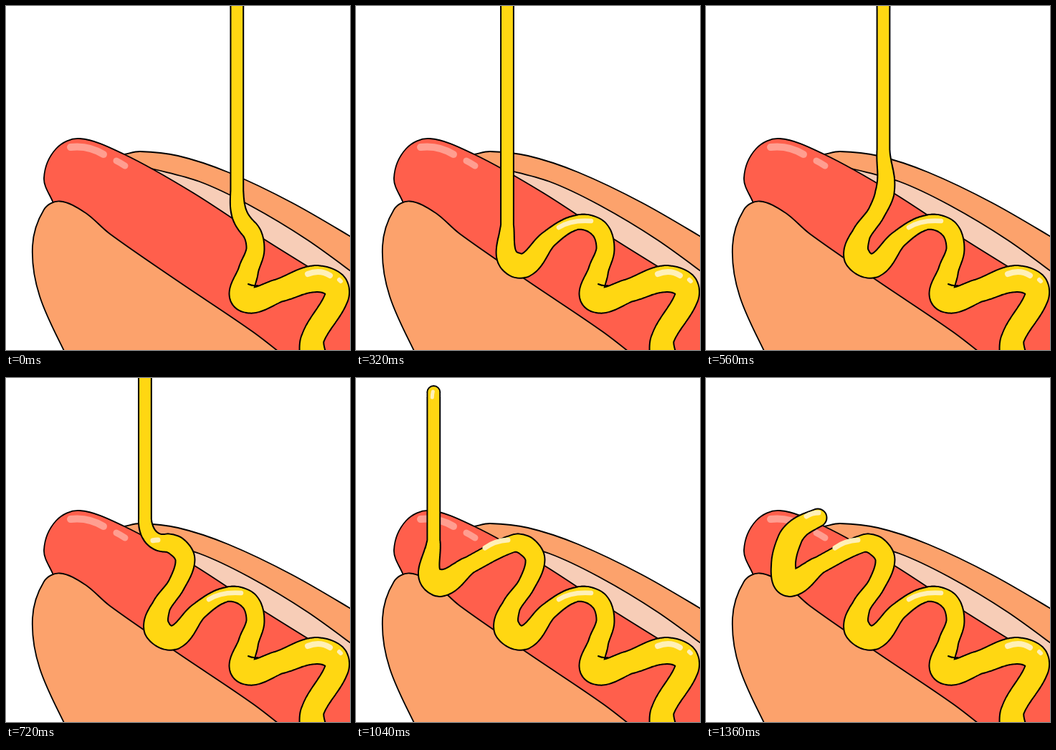
Animation of 480 by 480 pixels, one loop 1440 ms. Source, as an HTML page with a canvas:

```html
<!DOCTYPE html>
<html lang="en">
<head>
<meta charset="utf-8">
<title>Mustard pour</title>
<style>
  html, body { margin: 0; width: 100%; height: 100%; overflow: hidden; background: #fff; }
  canvas { display: block; width: 100vw; height: 100vh; }
</style>
</head>
<body>
<canvas id="stage" width="480" height="480"></canvas>
<script>
const ctx = document.getElementById('stage').getContext('2d');
const STEP = 80, LOOP = 1440;
const INK = '#000', BUN = '#fca26c', CREAM = '#f7cdb7', SAUSAGE = '#ff5f4c',
      SHINE = '#ff9e90', MUSTARD = '#ffd712', GLOSS = '#fff0b8';

// Centre line of the finished squiggle: x, y, thickness.
const knots = [
  [429, 495, 38], [428, 464, 32], [461, 407, 33], [457, 388, 36], [428, 381, 37],
  [381, 397, 32], [333, 408, 37], [338, 370, 28], [348, 338, 25], [338, 310, 25],
  [308, 302, 20], [269, 325, 24], [235, 362, 33], [211, 350, 37], [216, 320, 26],
  [238, 288, 24], [250, 254, 27], [238, 235, 28], [219, 231, 24], [158, 261, 24],
  [117, 286, 38], [108, 262, 34], [117, 225, 33], [131, 208, 29], [156, 195, 25]
];
const LAST = knots.length - 1;
// Step, and the knot the nozzle is above at that step.
const reachKeys = [[0, 9.55], [2, 11.5], [4, 13], [7, 16.4], [9, 18.4], [13, 20.7], [17, LAST]];
const LAG = 0.6, LIFT = 45, STREAM = 18, CUT = 13, FALL = 60;

const lerp = (a, b, k) => a + (b - a) * k;
const clamp = (v, lo, hi) => Math.min(hi, Math.max(lo, v));

function reachAt(step) {
  const next = reachKeys.findIndex(([s], i) => i > 0 && s >= step);
  const [s0, r0] = reachKeys[next - 1], [s1, r1] = reachKeys[next];
  return lerp(r0, r1, (step - s0) / (s1 - s0));
}

// Bezier control points of the smooth curve between points i and i + 1.
function controls(points, i) {
  const heading = j => {
    const [ax, ay] = points[Math.max(j - 1, 0)];
    const [bx, by] = points[Math.min(j + 1, points.length - 1)];
    const d = Math.hypot(bx - ax, by - ay);
    return [(bx - ax) / d, (by - ay) / d];
  };
  const [ax, ay] = points[i], [bx, by] = points[i + 1];
  const [ux, uy] = heading(i), [vx, vy] = heading(i + 1);
  const k = Math.hypot(bx - ax, by - ay) / 3;
  return [[ax, ay], [ax + ux * k, ay + uy * k], [bx - vx * k, by - vy * k], [bx, by]];
}

function bezier([a, b, c, d], k) {
  const m = 1 - k;
  return [0, 1].map(n => m * m * m * a[n] + 3 * m * m * k * b[n] + 3 * m * k * k * c[n] + k * k * k * d[n]);
}

function ribbonAt(u) {
  const i = Math.min(Math.floor(u), LAST - 1), k = u - i;
  return [...bezier(controls(knots, i), k), lerp(knots[i][2], knots[i + 1][2], k)];
}

function shape(fill, curve, corners = []) {
  ctx.beginPath();
  ctx.moveTo(...curve[0]);
  for (let i = 0; i < curve.length - 1; i++) {
    const [, b, c, d] = controls(curve, i);
    ctx.bezierCurveTo(...b, ...c, ...d);
  }
  corners.forEach(p => ctx.lineTo(...p));
  ctx.closePath();
  ctx.fillStyle = fill;
  ctx.fill();
  ctx.strokeStyle = INK;
  ctx.lineWidth = 1.8;
  ctx.stroke();
}

// Rounded dash along a quadratic curve, drawn up to the given share.
function dash(color, width, x0, y0, cx, cy, x1, y1, share = 1) {
  if (share <= 0) return;
  const k = Math.min(share, 1);
  const mx = lerp(x0, cx, k), my = lerp(y0, cy, k);
  ctx.beginPath();
  ctx.moveTo(x0, y0);
  ctx.quadraticCurveTo(mx, my, lerp(mx, lerp(cx, x1, k), k), lerp(my, lerp(cy, y1, k), k));
  ctx.strokeStyle = color;
  ctx.lineWidth = width;
  ctx.stroke();
}

function drawHotDog() {
  shape(BUN, [[165, 207], [187, 203], [240, 209], [310, 232], [400, 275], [500, 333]], [[500, 500]]);
  shape(CREAM, [[200, 226], [270, 245], [340, 278], [420, 326], [500, 384]], [[500, 430]]);
  shape(SAUSAGE, [[66, 275], [53, 240], [70, 199], [103, 185], [165, 207], [260, 260], [361, 326], [500, 412]],
    [[500, 500], [380, 500]]);
  dash(SHINE, 10, 90, 197, 115, 194, 136, 207);
  dash(SHINE, 9, 154, 216, 160, 219, 166, 223);
  shape(BUN, [[90, 500], [47, 405], [37, 335], [53, 284], [75, 272.5], [110, 288], [145, 318],
    [240, 384], [345, 455], [405, 502]]);
}

// Laid ribbon, then the curve that lifts off it into the falling stream.
function mustardPath(reach, top) {
  const pouring = reach < LAST;
  const laid = pouring ? reach - LAG : LAST;
  const path = [];
  for (let u = 0; u < laid; u += 1 / 24) path.push(ribbonAt(u));
  const end = ribbonAt(laid);
  path.push(end);
  if (!pouring) return path;

  const [x, landY] = ribbonAt(reach);
  const liftY = landY - LIFT;
  const [px, py] = ribbonAt(laid - 0.02);
  const turn = Math.hypot(end[0] - px, end[1] - py);
  const pull = 0.42 * Math.hypot(x - end[0], liftY - end[1]);
  const lift = [end, [end[0] + (end[0] - px) / turn * pull, end[1] + (end[1] - py) / turn * pull],
    [x, liftY + pull], [x, liftY]];
  for (let k = 0; k <= 1; k += 1 / 32) path.push([...bezier(lift, k), lerp(end[2], STREAM, k)]);
  for (let y = liftY; y > top + STREAM / 2; y -= 2) path.push([x, y, STREAM]);
  return path;
}

function sweep(path, color, grow) {
  ctx.beginPath();
  for (const [x, y, w] of path) {
    const r = w / 2 + grow;
    ctx.moveTo(x + r, y);
    ctx.arc(x, y, r, 0, Math.PI * 2);
  }
  ctx.fillStyle = color;
  ctx.fill();
}

function drawMustard(step) {
  const reach = reachAt(step);
  const top = Math.max(10 + FALL * (step - CUT), -20);
  const path = mustardPath(reach, top);
  sweep(path, INK, 1);
  sweep(path, MUSTARD, -1);
  dash(INK, 2, 338, 388, 344, 391, 351, 390);

  const shown = from => clamp((reach - from) * 2, 0, 1);
  dash(GLOSS, 8, 421, 374, 438, 367, 452, 376);
  dash(GLOSS, 6, 465, 382, 466, 383, 467, 384);
  dash(GLOSS, 6.5, 328, 300, 300, 298, 283, 309, shown(10.8));
  dash(GLOSS, 7, 212, 226, 194, 227, 180, 237, shown(18.3));
  dash(GLOSS, 7, 140, 193, 148, 188, 157, 188, shown(23.5));
  if (top > 0 && reach < LAST) {
    const [x, y] = path[path.length - 1];
    dash(GLOSS, 5, x - 1, y - 1, x - 2, y + 3, x - 2, y + 7);
  }
}

let drawn = -1;
function frame() {
  const step = Math.floor((performance.now() % LOOP) / STEP);
  if (step !== drawn) {
    drawn = step;
    ctx.fillStyle = '#fff';
    ctx.fillRect(0, 0, 480, 480);
    ctx.lineCap = ctx.lineJoin = 'round';
    drawHotDog();
    drawMustard(step);
  }
  requestAnimationFrame(frame);
}
frame();
</script>
</body>
</html>
```
